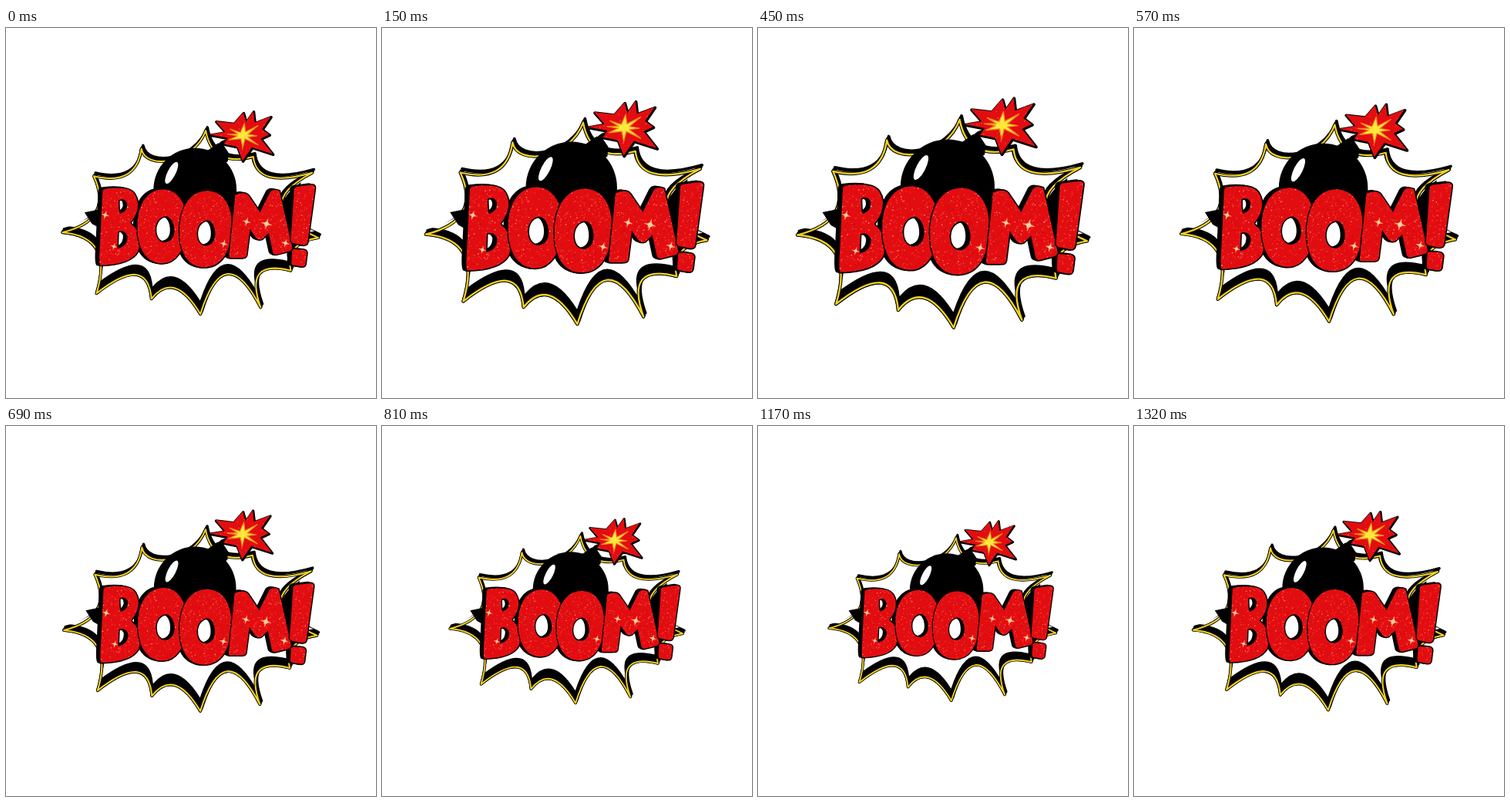
An HTML page that plays this animation: 480 by 480 pixels, repeating every 1350 ms.

```html
<!DOCTYPE html>
<html lang="en">
<head>
<meta charset="utf-8">
<title>Boom</title>
<style>
html, body { margin: 0; width: 100%; height: 100%; overflow: hidden; background: #fff; }
svg { display: block; width: 100vw; height: 100vh; }
</style>
</head>
<body>
<svg viewBox="0 0 480 480" role="img" aria-label="BOOM!">
  <defs>
    <path id="burst" d="M95 185Q158 200 166 144C172 176 243 168 262 117Q272 172 333 156Q338 204 421 180Q325 230 430 277Q380 285 389 326Q318 308 344 381Q290 276 254 391Q215 325 181 368Q175 300 99 360Q125 275 48 269Q125 250 95 185Z"/>
    <path id="blast" d="M268 123L291 119L277 103L304 106L318 90L322 104L333 88L335 105L359 96L346 115L357 123L344 129L362 152L331 142L317 162L309 141L289 137L295 128Z"/>
    <g id="word" fill-rule="evenodd">
      <path d="M112 204Q148 199 156 212Q168 232 149 255Q169 270 161 297Q150 317 105 318Q102 317 104 290L108 208Q108 205 112 204ZM132 221Q132 242 135 241Q148 235 144 224Q140 217 132 221ZM131 268L130 293Q146 290 145 274Q140 264 131 268Z"/>
      <path d="M197 205C221 204 235 228 234 260C233 296 215 316 196 315C172 314 160 292 160 260C160 228 174 206 197 205ZM201 245C191 247 186 257 187 268C188 279 195 285 202 284C212 282 216 274 215 263C214 252 208 244 201 245Z"/>
      <path d="M263 207C289 207 302 230 301 262C300 299 284 321 260 321C235 321 223 299 223 267C223 232 238 208 263 207ZM263 251C253 253 248 263 249 274C250 285 257 290 264 289C273 287 277 279 276 268C275 257 270 250 263 251Z"/>
      <path d="M306 213Q320 207 326 214L343 239L358 209Q362 203 372 207L391 291Q392 295 387 297L367 302Q363 302 362 298L356 270L346 279Q341 281 337 277L328 264L323 303Q322 307 317 307L300 307Q296 307 297 303Z"/>
      <path d="M398 201L421 198Q426 199 425 204L414 284Q413 288 408 288L393 285Q389 284 389 280L394 206Q394 202 398 201Z"/>
      <path d="M395 294L408 295Q413 296 413 300L411 316Q410 320 406 320L394 318Q390 318 390 313L391 297Q391 294 395 294Z"/>
    </g>
    <clipPath id="inWord"></clipPath>
    <clipPath id="inBlast"><use href="#blast"/></clipPath>
  </defs>

  <g id="art" stroke-linejoin="round" stroke-linecap="round">
    <g stroke="#000" stroke-width="4">
      <use href="#burst" transform="translate(2.5 -5)"/>
      <use href="#burst" transform="translate(1 -2)"/>
      <use href="#burst"/>
    </g>
    <use href="#burst" fill="#fff" transform="translate(240 165) scale(.97 .91) translate(-240 -165)"/>
    <use href="#burst" fill="none" stroke="#000" stroke-width="4.5"/>
    <use href="#burst" fill="none" stroke="#f1d022" stroke-width="2.4"/>
    <path d="M81 239L106 234V264L92 256Z"/>
    <path d="M404 194Q352 230 394 270Z"/>

    <path d="M184 205A62 62 0 0 1 308 205V238H184Z"/>
    <path d="M263 148L280 136L288 138L296 150L295 163L283 170Z"/>
    <path d="M281 143Q286 133 298 133" fill="none" stroke="#000" stroke-width="7"/>
    <ellipse cx="211" cy="180" rx="6" ry="18" fill="#fff" transform="rotate(27 211 180)"/>

    <use href="#blast" stroke="#000" stroke-width="4" transform="translate(.8 1)"/>
    <use href="#blast" fill="#e20d10"/>
    <g clip-path="url(#inBlast)">
      <g id="embers"></g>
      <path fill="#ffe83b" stroke="#f58a1c" stroke-width="1.6" transform="translate(318 124) scale(.85) translate(-318 -124)" d="M295 113L313 119L320 103L322 118L344 107L326 122L342 125L326 127L344 141L321 130L317 146L314 130L293 132L308 125L290 122L309 122Z"/>
    </g>

    <g stroke="#000" stroke-width="3">
      <use href="#word" transform="translate(-5 -1)"/>
      <use href="#word" transform="translate(-2.5)"/>
    </g>
    <use href="#word" fill="#e20d10" stroke="#000" stroke-width="3.4" paint-order="stroke"/>
    <g id="glitter" clip-path="url(#inWord)"></g>
  </g>
</svg>
<script>
const LOOP = 1350, STEP = 30;
const $ = id => document.getElementById(id);

function add(parent, tag, attrs) {
  const el = document.createElementNS('http://www.w3.org/2000/svg', tag);
  for (const k in attrs) el.setAttribute(k, attrs[k]);
  parent.appendChild(el);
}

let seed = 71;
const rnd = () => (seed = seed * 16807 % 2147483647) / 2147483647;

// One path per colour keeps the specks cheap to redraw.
function specks(parent, count, x, y, w, h, size, fill, opacity) {
  let d = '';
  for (let i = 0; i < count; i++) {
    const r = size * (.5 + rnd() * .7);
    d += `M${(x + rnd() * w).toFixed(1)} ${(y + rnd() * h).toFixed(1)}h${r.toFixed(2)}v${r.toFixed(2)}h${(-r).toFixed(2)}z`;
  }
  add(parent, 'path', { d, fill, opacity });
}

function star(x, y, r) {
  const q = r * .18;
  const d = `M${x} ${y - r}L${x + q} ${y - q}L${x + r} ${y}L${x + q} ${y + q}` +
    `L${x} ${y + r}L${x - q} ${y + q}L${x - r} ${y}L${x - q} ${y - q}Z`;
  add($('glitter'), 'path', { d, fill: '#ffb07c', transform: `rotate(15 ${x} ${y})` });
  add($('glitter'), 'circle', { cx: x, cy: y, r: r * .35, fill: '#ffcf9e' });
}

for (const p of $('word').children) add($('inWord'), 'path', { d: p.getAttribute('d'), 'clip-rule': 'evenodd' });

specks($('glitter'), 600, 102, 196, 326, 126, 1.7, '#c00a10', .6);
specks($('glitter'), 900, 102, 196, 326, 126, 1.6, '#f6403c', .8);
specks($('glitter'), 420, 102, 196, 326, 126, 1.4, '#ff8f7c', .9);
specks($('embers'), 90, 266, 87, 97, 76, 1.6, '#f6584c', .85);
[[112, 243, 7], [144, 231, 4], [125, 290, 6], [289, 286, 7], [323, 253, 7], [353, 256, 9], [381, 285, 7]]
  .forEach(s => star(...s));

function draw(t) {
  const k = Math.floor(t % LOOP / STEP) * STEP / LOOP;
  const s = .869 + .133 * Math.sin(2 * Math.PI * k);
  $('art').setAttribute('transform', `translate(240 240) scale(${s.toFixed(5)}) translate(-240 -240)`);
}

let start;
function tick(now) {
  if (start === undefined) start = now;
  draw(now - start);
  requestAnimationFrame(tick);
}
draw(0);
requestAnimationFrame(tick);
</script>
</body>
</html>
```
